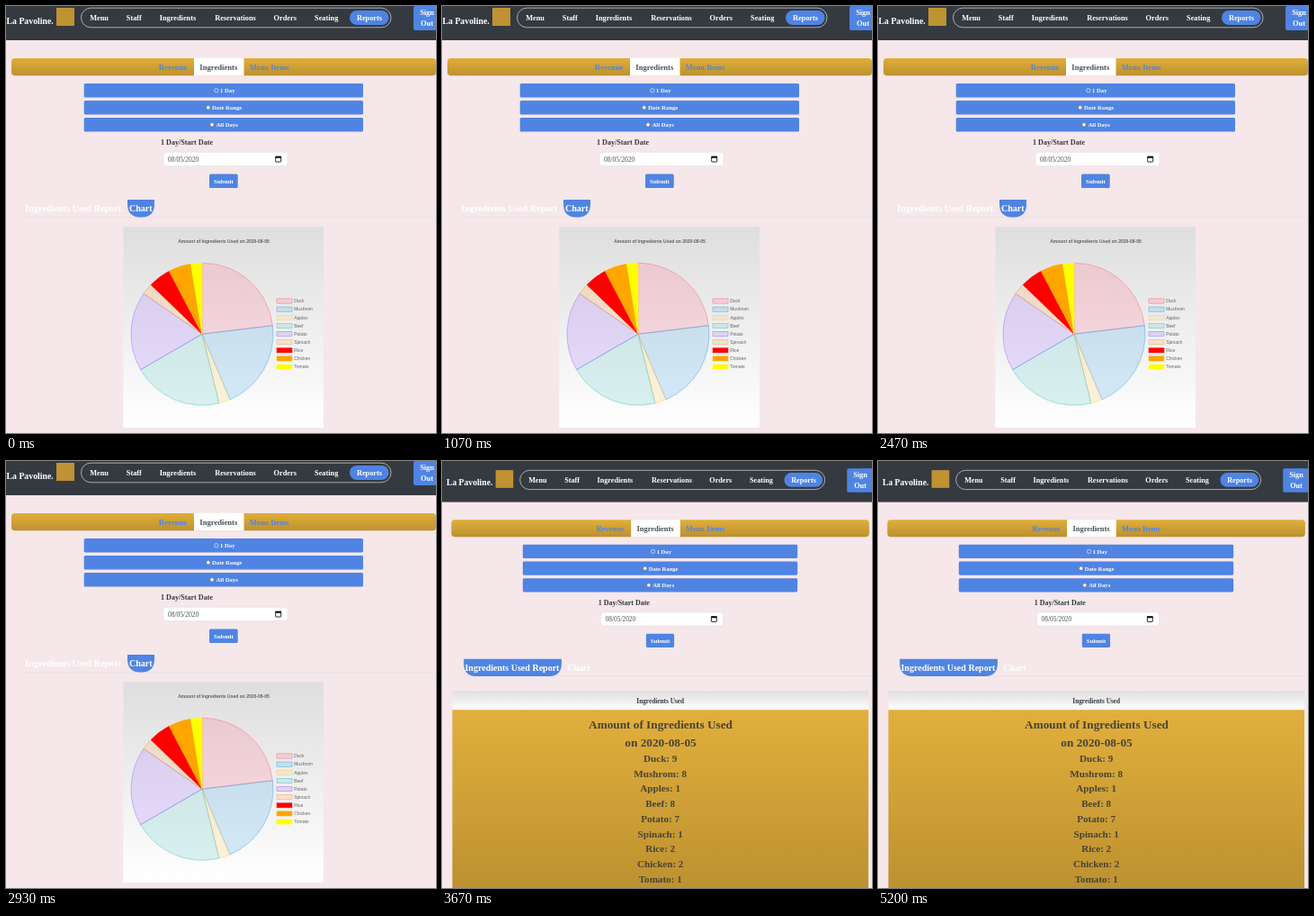
Recreate the animation shown at these times as an HTML page. Size 478 px wide and 474 px high, loop 5.99 s.

```html
<!DOCTYPE html>
<html lang="en">
<head>
<meta charset="utf-8">
<title>Ingredients report</title>
<style>
  html, body { margin: 0; width: 100%; height: 100%; overflow: hidden; background: #f5e7ea; }
  svg { display: block; width: 478px; height: 474px; }
  text { font-family: "Liberation Serif", serif; font-weight: bold; }
  .sans { font-family: "Liberation Sans", sans-serif; }
</style>
</head>
<body>
<svg id="stage" viewBox="0 0 478 474">
  <defs>
    <linearGradient id="bar" x2="0" y2="1"><stop stop-color="#e1ae39"/><stop offset="1" stop-color="#bc912f"/></linearGradient>
    <linearGradient id="body" x2="0" y2="1"><stop stop-color="#e1af3c"/><stop offset="1" stop-color="#bb9030"/></linearGradient>
    <linearGradient id="panel" x2="0" y2="1"><stop stop-color="#dedede"/><stop offset="1" stop-color="#ffffff"/></linearGradient>
  </defs>
  <g id="page"></g>
  <g id="chart"></g>
  <g id="report"></g>
</svg>
<script>
const LOOP = 5990, SWITCH = 3000;
const BLUE = '#4f84e3', DARK = '#343a40', INK = '#474339';
const $ = id => document.getElementById(id);

const items = [
  ['Duck', 9, '255,99,132'], ['Mushrom', 8, '54,162,235'], ['Apples', 1, '255,206,86'],
  ['Beef', 8, '75,192,192'], ['Potato', 7, '153,102,255'], ['Spinach', 1, '255,159,64'],
  ['Rice', 2, '255,0,0', 1], ['Chicken', 2, '255,165,0', 1], ['Tomato', 1, '255,255,0', 1]
];

const rect = (x, y, w, h, fill, rx = 0, extra = '') =>
  `<rect x="${x}" y="${y}" width="${w}" height="${h}" rx="${rx}" fill="${fill}" ${extra}/>`;
const text = (label, x, y, size, fill, anchor = 'middle', extra = '') =>
  `<text x="${x}" y="${y}" font-size="${size}" fill="${fill}" text-anchor="${anchor}" ${extra}>${label}</text>`;
const tint = ([, , rgb, alpha = 0.2]) =>
  `fill="rgba(${rgb},${alpha})" stroke="rgb(${rgb})" stroke-width=".45"`;

// Blue tab with rounded lower corners
const roundTab = (x, w) =>
  `<path fill="${BLUE}" d="M${x} 215h${w}v5q0 14-14 14.5h${28 - w}q-14-.5-14-14.5z"/>`;

function navbar() {
  const links = [['Menu', 103.5], ['Staff', 142.3], ['Ingredients', 191], ['Reservations', 255],
    ['Orders', 310.3], ['Seating', 356.2], ['Reports', 404]];
  return rect(-20, -20, 530, 58, DARK)
    + text('La Pavoline.', 0.5, 19.5, 9.8, '#fff', 'start')
    + rect(56, 2, 20, 20, '#bf9232')
    + rect(83.5, 2.2, 344.5, 21.6, 'none', 10.8, 'stroke="#c8cacc" stroke-width=".8"')
    + rect(382, 5, 43.5, 16, BLUE, 8)
    + links.map(([label, x]) => text(label, x, 16.2, 8.3, '#fff')).join('')
    + rect(453, 0, 40, 27, BLUE, 2)
    + text('Sign', 468, 10.3, 8.3, '#fff') + text('Out', 468, 21.8, 8.3, '#fff');
}

function form() {
  const options = [['1 Day', 233.8, 238], ['Date Range', 224.8, 229], ['All Days', 229, 233.5]];
  return rect(6, 58, 472, 19.3, 'url(#bar)', 4)
    + rect(209, 57.8, 55.5, 19.7, '#fff')
    + text('Revenue', 185.5, 71, 8.6, BLUE)
    + text('Ingredients', 236.3, 71, 8.6, '#495057')
    + text('Menu Items', 292.7, 71, 8.5, BLUE)
    + options.map(([label, cx, x], i) => {
      const y = 86 + 19 * i;
      return rect(86.7, y, 310.3, 15.5, BLUE, 1.5)
        + `<circle cx="${cx}" cy="${y + 7.8}" r="2.2" fill="${i ? '#fff' : BLUE}" stroke="${i ? '#666' : '#fff'}" stroke-width=".6"/>`
        + text(label, x, y + 10.2, 6.7, '#fff', 'start');
    }).join('')
    + text('1 Day/Start Date', 172, 154, 8.1, DARK, 'start')
    + rect(175, 162.3, 138, 15.3, '#fff', 2, 'stroke="#dcd8dc" stroke-width=".5"')
    + text('08/05/2020', 180, 172.7, 7.5, '#495057', 'start', 'style="font-weight:normal"')
    + rect(299.7, 167.2, 6, 5.8, 'none', 0.5, 'stroke="#111" stroke-width=".9"')
    + rect(299.4, 166.8, 6.6, 2, '#111')
    + rect(226, 186.5, 31.7, 15.6, BLUE, 1.5)
    + text('Submit', 241.9, 197, 7, '#fff');
}

function tabs(chartOpen) {
  return rect(20, 234, 470, 0.6, '#e3dfe3')
    + (chartOpen ? roundTab(135, 30) : roundTab(20, 110.5))
    + text('Ingredients Used Report', 21.3, 228, 10.2, '#fff', 'start')
    + text('Chart', 149.8, 228, 10.1, '#fff');
}

function pie(cx, cy, r) {
  const total = items.reduce((sum, item) => sum + item[1], 0);
  const point = n => {
    const a = n / total * 2 * Math.PI;
    return `${cx + r * Math.sin(a)} ${cy - r * Math.cos(a)}`;
  };
  let sum = 0;
  return items.map(item => {
    const start = point(sum);
    sum += item[1];
    return `<path ${tint(item)} d="M${cx} ${cy}L${start}A${r} ${r} 0 0 1 ${point(sum)}z"/>`;
  }).join('');
}

function chart() {
  return rect(130.3, 245.3, 222.7, 222.7, 'url(#panel)')
    + text('Amount of Ingredients Used on 2020-08-05', 242, 262.6, 5.03, '#606060', 'middle', 'class="sans"')
    + pie(218, 364.2, 79)
    + items.map((item, i) => {
      const y = 327.5 + 9.13 * i;
      return `<rect x="301" y="${y - 2.6}" width="17" height="5.2" ${tint(item)}/>`
        + text(item[0], 320.2, y + 1.8, 5, '#666', 'start', 'class="sans" style="font-weight:normal"');
    }).join('');
}

function report() {
  return rect(11.5, 255.3, 462.5, 21, 'url(#panel)')
    + text('Ingredients Used', 242.7, 268.6, 7.3, DARK)
    + rect(11.5, 276.2, 462.5, 206, 'url(#body)')
    + text('Amount of Ingredients Used', 243, 297, 13.25, INK)
    + text('on 2020-08-05', 243, 317.3, 13.3, INK)
    + items.map(([name, count], i) => text(`${name}: ${count}`, 242.7, 334 + 16.7 * i, 11.1, INK)).join('');
}

$('chart').innerHTML = chart();
$('report').innerHTML = report();
const header = navbar() + form();
let shown = null;

function show(chartOpen) {
  shown = chartOpen;
  $('page').innerHTML = header + tabs(chartOpen);
  // The report view is slightly zoomed out
  $('page').setAttribute('transform', chartOpen ? '' : 'translate(4.5 8.2) scale(.984)');
  $('chart').style.display = chartOpen ? '' : 'none';
  $('report').style.display = chartOpen ? 'none' : '';
}

const origin = performance.now();
function tick() {
  const chartOpen = (performance.now() - origin) % LOOP < SWITCH;
  if (chartOpen !== shown) show(chartOpen);
  requestAnimationFrame(tick);
}
tick();
</script>
</body>
</html>
```
